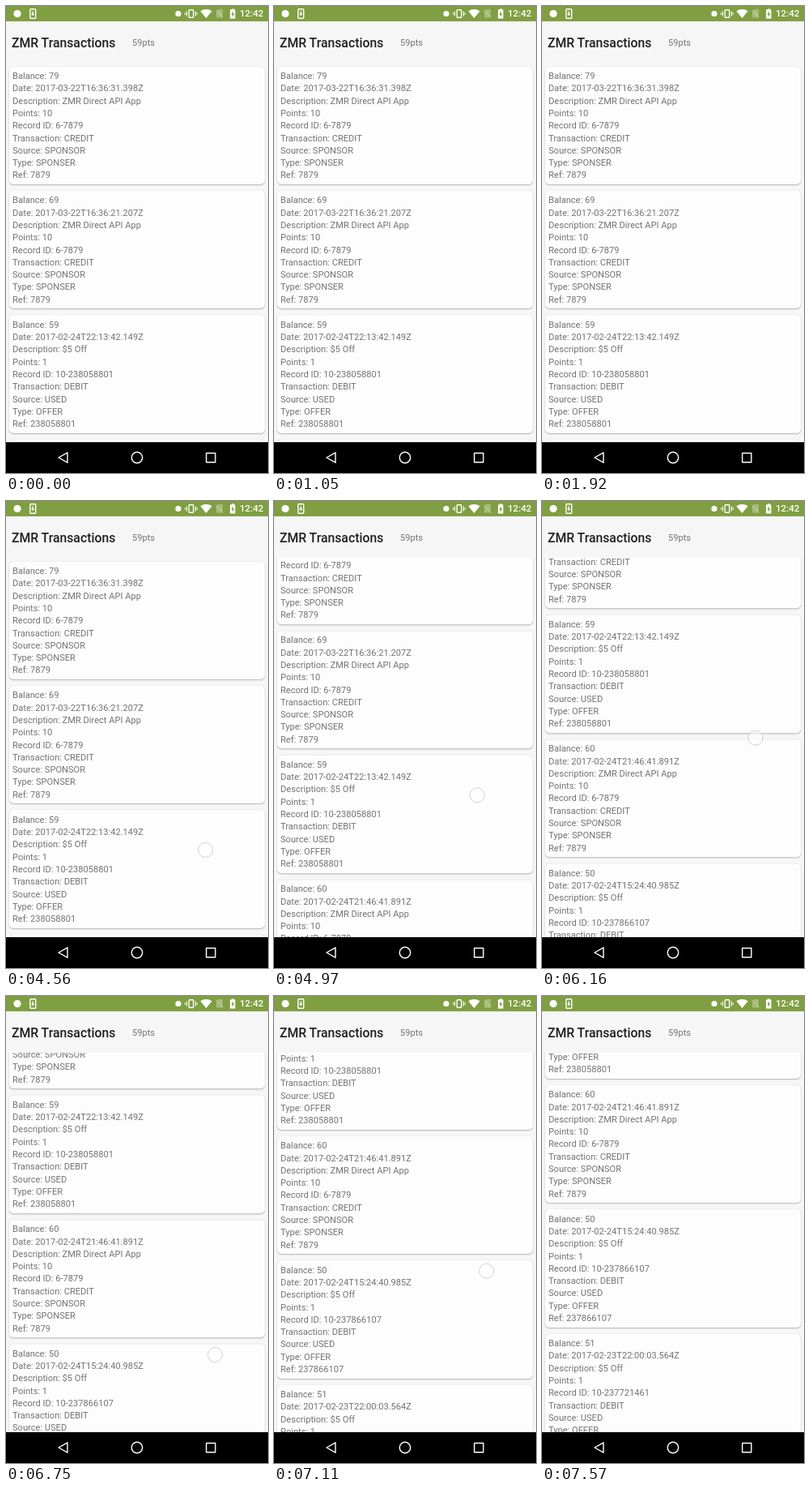
An HTML page for the animation above (8 s loop, 324 px wide and 576 px high).

```html
<!DOCTYPE html>
<html lang="en">
<head>
<meta charset="utf-8">
<title>Transactions</title>
<style>
  html, body { margin: 0; width: 100%; height: 100%; overflow: hidden; }
  body { background: #f6f6f7; font-family: Roboto, "Noto Sans", sans-serif; }
  #stage { position: absolute; left: 0; top: 0; width: 324px; height: 576px; overflow: hidden; background: #f6f6f7; }
  #view { position: absolute; left: 0; top: 70px; width: 324px; height: 468px; overflow: hidden; }
  #list { position: absolute; left: 0; top: 4.5px; width: 324px; }
  .card {
    position: absolute; left: 4px; width: 316px; height: 145.5px; box-sizing: border-box;
    padding: 4.6px 0 0 4px; border-radius: 5px; background: #fdfdfd;
    box-shadow: 0 1px 1.5px rgba(60, 60, 80, .34), 0 0 1px rgba(60, 60, 80, .2);
    color: #737375; font-size: 11.1px; line-height: 15.28px; white-space: pre;
  }
  h1, #points { position: absolute; top: 36px; margin: 0; white-space: pre; line-height: 20px; }
  h1 { left: 7px; font-size: 15.76px; font-weight: 500; color: #1f1f1f; }
  #points { left: 156px; font-size: 11.1px; color: #737375; }
  svg { position: absolute; left: 0; top: 0; }
  #touch {
    position: absolute; left: -9.5px; top: -9.5px; width: 19px; height: 19px; box-sizing: border-box;
    border: 1.2px solid #d0d0d8; border-radius: 50%; background: rgba(255, 255, 255, .55);
  }
</style>
</head>
<body>
<div id="stage">
  <h1>ZMR Transactions</h1>
  <div id="points">59pts</div>
  <div id="view"><div id="list"></div></div>
  <div id="touch"></div>
  <svg width="324" height="576" viewBox="0 0 324 576">
    <rect width="324" height="18.9" fill="#7f9f42"/>
    <g fill="#fff">
      <circle cx="14" cy="9.5" r="4.6"/>
      <rect x="29.8" y="3.7" width="6.900" height="11.500" rx="1" fill="none" stroke="#fff" stroke-width="1.400"/>
      <path d="M32.500 6.500h1.400v3h1.600l-2.300 2.800-2.300-2.800h1.600z"/>
      <circle cx="213" cy="9.5" r="3.6"/>
      <rect x="226.2" y="4.7" width="5.600" height="9.500" rx="1" fill="none" stroke="#fff" stroke-width="1.400"/>
      <path d="M223.500 6.500v6M221.700 8v3M234.500 6.500v6M236.300 8v3" stroke="#fff"/>
      <path d="M240.300 6.300Q247.500 1.700 254.700 6.300L247.500 15z"/>
      <path d="M262.500 4h5.500v10.500h-8v-8z" opacity=".3"/>
      <path fill-rule="evenodd" d="M279 3.500h3v1h1.500v11h-6.500v-11h2zM280.900 6.500l-2.600 4h1.700v3l2.500-4h-1.600z"/>
      <text x="289" y="13.3" font-size="11.6" font-weight="500">12:42</text>
    </g>
    <path d="M259.500 4.500l9 10" stroke="#fff" stroke-opacity=".35"/>
    <rect y="538" width="324" height="38"/>
    <g fill="none" stroke="#fff" stroke-width="1.400" stroke-linejoin="round">
      <path d="M65 557L76 550.800V563.200z"/>
      <circle cx="162" cy="557" r="6.700"/>
      <rect x="247.700" y="551.500" width="11.200" height="11.200"/>
    </g>
  </svg>
</div>
<script>
const LOOP = 8000, PITCH = 153.4;
const $ = id => document.getElementById(id);
const list = $('list'), touch = $('touch');

// balance, date, and the offer's reference; no reference means a sponsor credit
const records = [
  [79, '2017-03-22T16:36:31.398Z'],
  [69, '2017-03-22T16:36:21.207Z'],
  [59, '2017-02-24T22:13:42.149Z', 238058801],
  [60, '2017-02-24T21:46:41.891Z'],
  [50, '2017-02-24T15:24:40.985Z', 237866107],
  [51, '2017-02-23T22:00:03.564Z', 237721461]
];

records.forEach(([balance, date, offer], i) => {
  const card = document.createElement('div');
  card.className = 'card';
  card.style.top = i * PITCH + 'px';
  card.textContent = [
    `Balance: ${balance}`,
    `Date: ${date}`,
    `Description: ${offer ? '$5 Off' : 'ZMR Direct API App'}`,
    `Points: ${offer ? 1 : 10}`,
    `Record ID: ${offer ? '10-' + offer : '6-7879'}`,
    `Transaction: ${offer ? 'DEBIT' : 'CREDIT'}`,
    `Source: ${offer ? 'USED' : 'SPONSOR'}`,
    `Type: ${offer ? 'OFFER' : 'SPONSER'}`,
    `Ref: ${offer || 7879}`
  ].join('\n');
  list.append(card);
});

// each swipe scrolls by dist; the finger starts at x, y and lifts after HOLD of the time
const HOLD = 0.67;
const swipes = [
  { at: 4560, dur: 860, dist: 99.5, x: 246, y: 430 },
  { at: 5500, dur: 1020, dist: 159.2, x: 257, y: 433 },
  { at: 6750, dur: 820, dist: 166.4, x: 258, y: 442 }
];

// quick drag, then a longer glide to rest
function ease(u) {
  const v = 1 - (1 - u) ** 1.5;
  return v * v * (3 - 2 * v);
}

function draw(t) {
  let offset = 0;
  touch.style.visibility = 'hidden';
  for (const { at, dur, dist, x, y } of swipes) {
    const u = Math.min(Math.max((t - at) / dur, 0), 1);
    const moved = dist * ease(u);
    offset += moved;
    if (t >= at && u < HOLD) {
      touch.style.visibility = 'visible';
      touch.style.transform = `translate(${x + 10 * u}px, ${y - moved}px)`;
    }
  }
  list.style.transform = `translateY(${-offset}px)`;
}

const start = performance.now();
function tick() {
  draw((performance.now() - start) % LOOP);
  requestAnimationFrame(tick);
}
tick();
</script>
</body>
</html>
```
